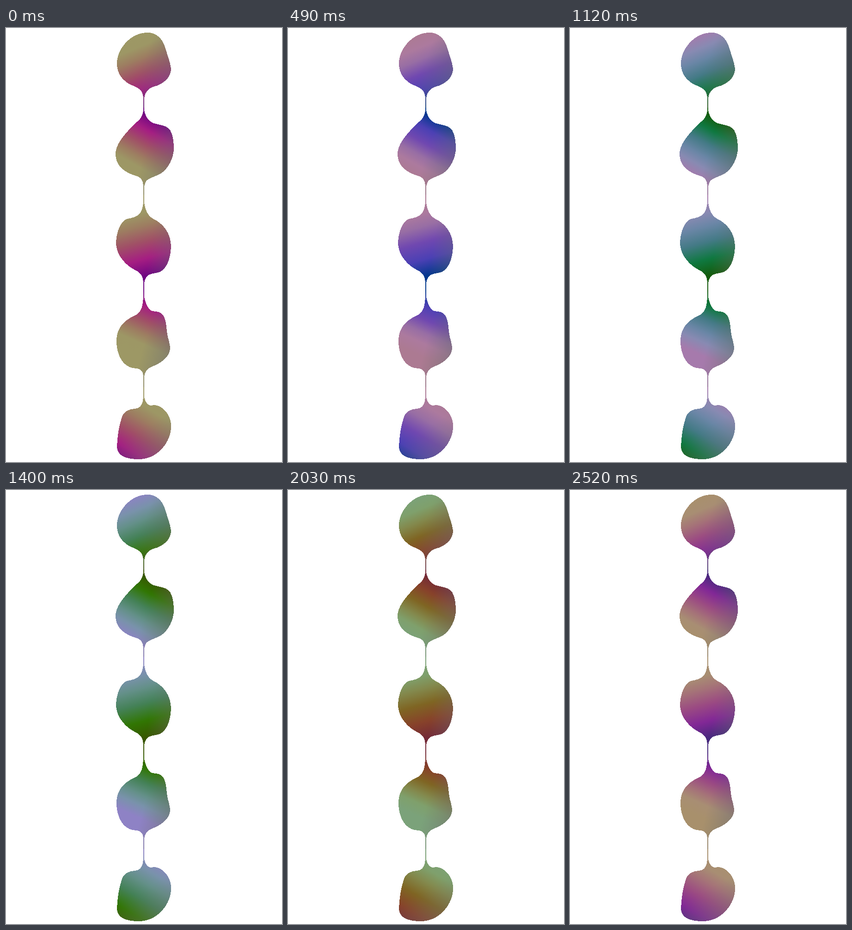
An HTML page that plays this animation: 597 by 937 pixels, repeating every 2.59 s.

```html
<!DOCTYPE html>
<html lang="en">
<head>
<meta charset="utf-8">
<title>Drops on a string</title>
<style>
html, body { margin: 0; width: 100%; height: 100%; overflow: hidden; background: #fff; }
svg { display: block; width: 597px; height: 937px; }
path { shape-rendering: crispEdges; stroke-width: 1; }
</style>
</head>
<body>
<!-- Outlines run through pixel centres; the stroke covers the outer half pixel. -->
<svg id="stage" viewBox="-.5 -.5 597 937" xmlns="http://www.w3.org/2000/svg"></svg>
<script>
const STEP = 70, STEPS = 37;
const OFFSETS = [0, .2, .36, .56, .78, 1];

// Outline, colour axis and grey shade axis of each drop, top to bottom.
const drops = [
  { d: 'M298 172V150C300 140 306 130 318 126C338 121 356 107 356 88C355 74 348 58 343 41C337 22 324 10 306 10C270 10 240 44 240 76C240 97 252 112 268 121C284 127 297 132 297 152V172Z',
    axis: [248, 24, 306, 164], shade: [300, 60, 365, 85] },
  { d: 'M298 172V178C301 190 306 201 320 206C336 210 347 211 354 220C360 230 362 245 362 259C362 280 350 302 336 312C324 320 308 322 302 330C300 334 298 338 298 344V360H297V342C297 330 292 322 283 319C262 313 237 300 237 271C237 252 254 232 272 213C284 200 294 198 297 178V172Z',
    axis: [246, 308, 312, 190], shade: [305, 250, 368, 270] },
  { d: 'M298 360V376C300 392 305 404 316 411C338 421 356 442 356 472C355 496 347 522 328 527C312 530 301 530 298 550V565H297V548C296 536 292 529 282 523C262 514 238 492 238 462C239 440 248 416 262 412C280 409 295 405 297 376V360Z',
    axis: [262, 374, 306, 534], shade: [315, 455, 378, 466] },
  { d: 'M298 565V580C301 594 306 607 315 611C324 612 333 612 339 620C347 632 345 647 349 666C352 678 354 684 354 691C353 708 338 720 320 728C307 733 300 738 298 752V775H297V752C297 741 291 735 281 734C252 733 239 704 239 675C239 651 252 633 276 622C292 616 296 602 297 580V565Z',
    axis: [266, 698, 320, 576], shade: [305, 655, 360, 670] },
  { d: 'M298 775V796C300 806 304 814 313 815C319 814 325 813 335 819C348 828 356 842 356 858C357 893 327 930 286 930C262 930 240 924 240 902C241 882 245 856 251 839C255 828 264 823 278 822C291 821 296 812 297 796V775Z',
    axis: [340, 802, 256, 946], shade: [300, 860, 345, 935] }
];

// Colour ramps along the axis, keyed by step.
const ramps = [
  [0, '9d9865 9d9765 9d7d61 a05066 a51e82 6e0582'],
  [7, 'ac7a92 ac7a9e 986ea4 7048b0 4b40b4 00378c'],
  [11, 'a678aa a07db2 8476b8 6468b4 195f96 005f55'],
  [16, 'a67aac 888ab2 6a86a6 447a86 0f7840 145a0a'],
  [25, '7098a4 6c9e88 6a9464 587d30 645f0a 693f0a'],
  [32, '8ea070 919b6c 967a5f 964b55 912d69 6e1e5f'],
  [36, 'a8906c a88e73 a57378 9b4b82 822896 46287d']
].map(([at, list]) => ({ at, colours: list.split(' ').map(toPolar) }));

// Hex colour to luma, chroma and hue angle.
function toPolar(hex) {
  const [r, g, b] = [0, 2, 4].map(i => parseInt(hex.slice(i, i + 2), 16));
  const y = .299 * r + .587 * g + .114 * b;
  const u = .492 * (b - y), v = .877 * (r - y);
  return { y, c: Math.hypot(u, v), h: Math.atan2(v, u) * 180 / Math.PI };
}

function toRgb({ y, c, h }) {
  const a = h * Math.PI / 180;
  const r = y + c * Math.sin(a) / .877, b = y + c * Math.cos(a) / .492;
  const g = (y - .299 * r - .114 * b) / .587;
  return `rgb(${[r, g, b].map(n => Math.round(Math.max(0, Math.min(255, n)))).join()})`;
}

// The hue always turns the same way round.
function mix(p, q, k) {
  let turn = ((q.h - p.h) % 360 + 360) % 360;
  if (turn > 60) turn -= 360;
  return { y: p.y + (q.y - p.y) * k, c: p.c + (q.c - p.c) * k, h: p.h + turn * k };
}

const stage = document.getElementById('stage');

function add(parent, tag, attrs) {
  const el = document.createElementNS(stage.namespaceURI, tag);
  for (const key in attrs) el.setAttribute(key, attrs[key]);
  return parent.appendChild(el);
}

function gradient(id, [x1, y1, x2, y2]) {
  return add(stage, 'linearGradient', { id, x1, y1, x2, y2, gradientUnits: 'userSpaceOnUse' });
}

const stops = OFFSETS.map(() => []);
drops.forEach(({ d, axis, shade }, i) => {
  const ramp = gradient('ramp' + i, axis);
  OFFSETS.forEach((offset, n) => stops[n].push(add(ramp, 'stop', { offset })));
  const grey = gradient('grey' + i, shade);
  [0, .5].forEach((alpha, offset) =>
    add(grey, 'stop', { offset, 'stop-color': '#707070', 'stop-opacity': alpha }));
  for (const name of ['ramp', 'grey']) {
    const paint = `url(#${name}${i})`;
    add(stage, 'path', { d, fill: paint, stroke: paint });
  }
});

let shown = -1;
function show(step) {
  if (step === shown) return;
  shown = step;
  let i = 0;
  while (i < ramps.length - 2 && step >= ramps[i + 1].at) i++;
  const from = ramps[i], to = ramps[i + 1];
  const k = (step - from.at) / (to.at - from.at);
  stops.forEach((group, n) => {
    const colour = toRgb(mix(from.colours[n], to.colours[n], k));
    group.forEach(stop => stop.setAttribute('stop-color', colour));
  });
}

const start = performance.now();
function tick() {
  show(Math.floor((performance.now() - start) / STEP) % STEPS);
  requestAnimationFrame(tick);
}
tick();
</script>
</body>
</html>
```
